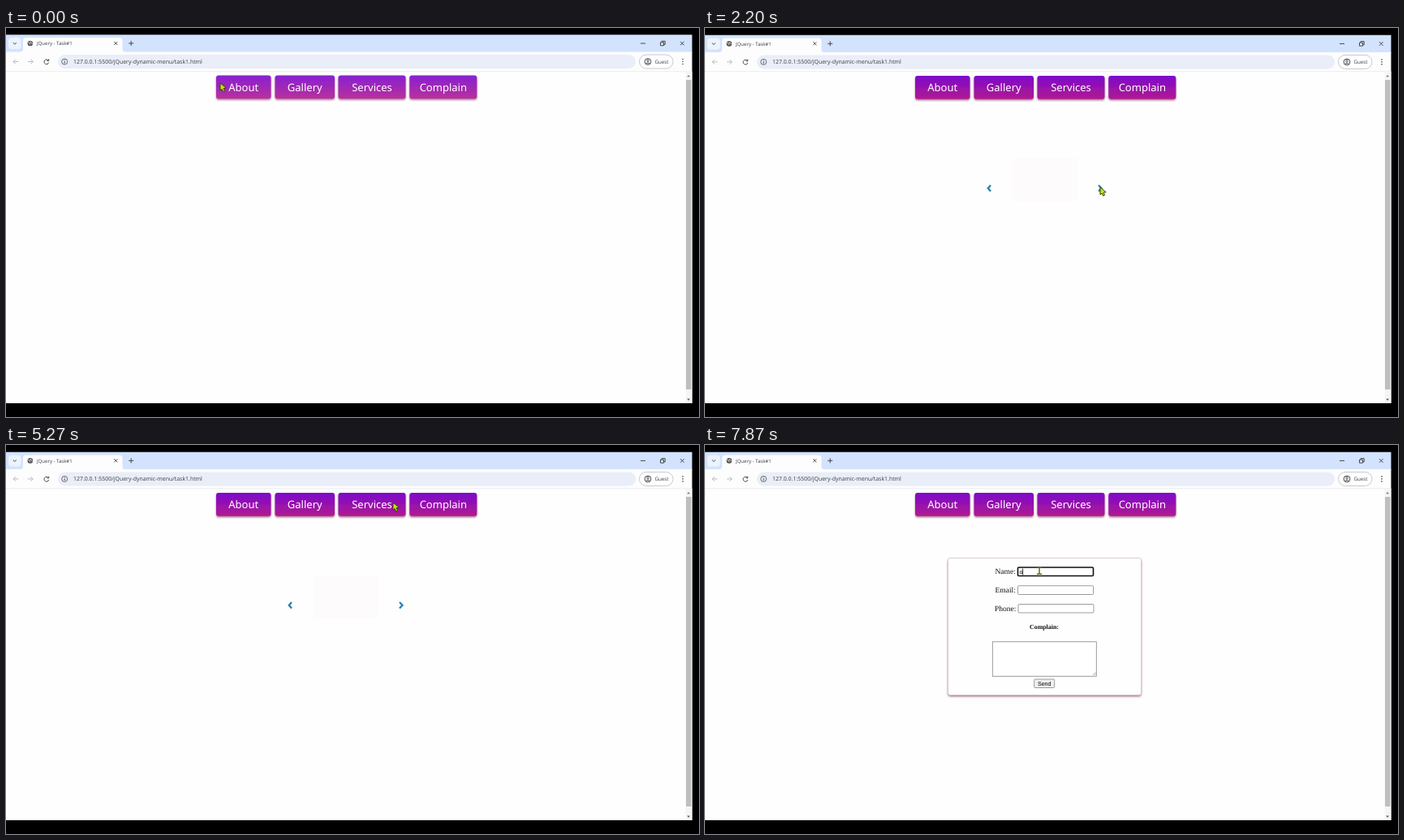
These frames come from a looping animation (854x480 px, 8 s). An HTML page:

```html
<!DOCTYPE html>
<html lang="en">
<head>
<meta charset="utf-8">
<title>Dynamic menu</title>
<style>
html, body { margin: 0; width: 100%; height: 100%; overflow: hidden; background: #000; }
svg { display: block; width: 854px; height: 480px; text-rendering: geometricPrecision; }
.ui { font-family: "Open Sans", sans-serif; fill: #3a3d42; }
.menu { font: 500 13px "Noto Sans", sans-serif; fill: #fff; text-anchor: middle; }
.item { font: 700 8.7px "Noto Sans", sans-serif; fill: #fff; text-anchor: middle; }
.serif { font: 9.5px "Liberation Serif", serif; fill: #111; }
.line { fill: none; stroke: #45484c; stroke-width: 1; }
.field { fill: #fff; stroke: #858585; stroke-width: .8; }
.card { fill: #fefefe; stroke: #d5bfca; stroke-width: .7; filter: url(#soft); }
</style>
</head>
<body>
<svg viewBox="0 0 854 480">
  <defs>
    <linearGradient id="purple" x1="0" y1="0" x2="0" y2="1">
      <stop id="top"/><stop id="bottom" offset="1"/>
    </linearGradient>
    <linearGradient id="warm"><stop stop-color="#f3dccf"/><stop offset="1" stop-color="#faf0dc"/></linearGradient>
    <linearGradient id="cold" x1="0" y1="0" x2="0" y2="1">
      <stop stop-color="#e4e9ea"/><stop offset=".5" stop-color="#e2eff4"/><stop offset="1" stop-color="#b4dcec"/>
    </linearGradient>
    <filter id="soft" x="-10%" y="-10%" width="120%" height="135%">
      <feDropShadow dx="0" dy="1.5" stdDeviation="1" flood-color="#7a2050" flood-opacity=".65"/>
    </filter>
    <clipPath id="frame"><rect x="379" y="161" width="79" height="52.5" rx="2"/></clipPath>
    <clipPath id="slide"><rect id="slideBox" x="405" y="88.5" width="84" height="0"/></clipPath>
  </defs>

  <rect width="854" height="480"/>
  <g id="chrome">
    <rect y="8.3" width="845.5" height="22" fill="#d3e3fd"/>
    <rect y="29.5" width="845.5" height="24.5" fill="#fdfdfe"/>
    <rect x="3" y="12" width="15.5" height="14" rx="4" fill="#edf3fe"/>
    <path class="line" d="M8.7 18l2.1 2 2.1-2"/>
    <path d="M17 30q4-.5 4-4.500V16q0-4 4-4h114.500q4 0 4 4v9.500q0 4 4 4.500z" fill="#fdfdfe"/>
    <circle cx="29.800" cy="19" r="3.300" fill="#55585c"/>
    <path d="M27.200 17.700l2 .7.400 2 M30.300 16.600l.3 1.800 2 .700" fill="none" stroke="#f4f4f4" stroke-width=".8"/>
    <text class="ui" x="38" y="21.300" font-size="6.050">JQuery - Task#1</text>
    <path class="line" d="M133.300 16.900l4 4m0-4l-4 4M151.200 18.900h6m-3-3v6M782 19h6M831 16.700l4.600 4.600m0-4.600l-4.600 4.600"/>
    <path class="line" d="M806.500 17.700h4v4h-4zM808 17.500v-1.300h4.200v4.200h-1.500" stroke-width=".8"/>
    <path class="line" d="M15.200 41.500H9m2.800-2.800L9 41.500l2.800 2.800M27 41.500h6.200m-2.800-2.800l2.800 2.800-2.800 2.800" style="stroke:#b8babd"/>
    <path class="line" d="M52.200 40a2.900 2.900 0 1 0 .5 2.600M52.700 38.300v2.200h-2.200"/>
    <rect x="64" y="33" width="712" height="17" rx="8.500" fill="#e9eef8"/>
    <circle class="line" cx="72.200" cy="41.500" r="3.500" style="stroke-width:.8"/>
    <path class="line" d="M72.200 41v2.500M72.200 39.300v.9"/>
    <text class="ui" x="83" y="44" font-size="6.960">127.0.0.1:5500/jQuery-dynamic-menu/task1.html</text>
    <rect x="780.500" y="33" width="41.500" height="17" rx="8.500" fill="#fff" stroke="#b9bcc1" stroke-width=".8"/>
    <circle class="line" cx="791" cy="41.500" r="3.900"/>
    <circle class="line" cx="791" cy="40.300" r="1.300" style="stroke-width:.9"/>
    <path class="line" d="M788.500 44q2.500-2 5 0"/>
    <text class="ui" x="799.500" y="43.700" font-size="6.200">Guest</text>
    <path d="M834 38.500v.01M834 41.500v.01M834 44.500v.01" stroke="#45484c" stroke-width="1.600" stroke-linecap="round"/>
  </g>
  <rect y="54" width="845.500" height="409" fill="#fefefe"/>
  <rect y="53.500" width="845.500" height=".7" fill="#e3e5e8"/>
  <rect x="837.500" y="54" width="8" height="409" fill="#f5f5f5"/>
  <rect x="838" y="64" width="6.500" height="382" fill="#bfbfbf"/>
  <path d="M839.200 60.300l1.900-2.200 1.900 2.200z" fill="#777"/>
  <path d="M839.200 457.500l1.900 2.200 1.900-2.200z" fill="#555"/>

  <g id="about">
    <rect class="card" x="286" y="143" width="265" height="156" rx="3"/>
    <g id="lines"></g>
  </g>

  <g id="gallery">
    <path d="M352 194l-3.200 3.700 3.200 3.800M485 194l3.500 3.700-3.500 3.800" fill="none" stroke="#2c7fae" stroke-width="2.300"/>
    <rect x="379" y="161" width="79" height="52.500" fill="#fdfbfb"/>
    <g clip-path="url(#frame)">
      <g id="pic0">
        <rect x="379" y="161" width="79" height="53" fill="url(#warm)"/>
        <g id="bokeh"></g>
        <path d="M379 205q30-7 79 0v9h-79z" fill="#f3dcc4"/>
        <ellipse cx="433" cy="201" rx="18" ry="13" fill="#f6ede0"/>
        <ellipse cx="452" cy="197" rx="6" ry="4" fill="#f4e9da" transform="rotate(30 452 197)"/>
        <circle cx="432" cy="175" r="14.500" fill="#f9eee2"/>
        <path d="M409 166q0-6 8-6h28q6 3 5 10-18-8-36-1z" fill="#267fac"/>
        <path d="M410 166q20-6 39 2" fill="none" stroke="#7dbbd0" stroke-width="1.500"/>
        <path d="M417 180q16 8 28 1l-2 5q-9 4-18 2z" fill="#4aa2b0"/>
        <path d="M421 183l14 3-9 20-14-5z" fill="#f0cf48"/>
        <path d="M419 186l15 4M416 192l14 5M413 198l14 5" stroke="#d14f3c" stroke-width="2.200"/>
        <path d="M420 183l15 4M415 195l13 5" stroke="#398ba6" stroke-width="1.500"/>
        <circle cx="432" cy="176.500" r="3.400" fill="#ee8524"/>
        <path d="M427 172v.01M437.500 172v.01" stroke="#222" stroke-width="2" stroke-linecap="round"/>
        <path d="M425.500 179q6 5.500 13 0" fill="none" stroke="#90584a" stroke-width=".8"/>
        <path d="M416.700 161v23" stroke="#fff5ec" stroke-width="1"/>
      </g>
      <g id="pic1">
        <rect x="379" y="161" width="79" height="53" fill="url(#cold)"/>
        <path d="M379 194q20-4 38 4t41 4v12h-79z" fill="#b9dfee"/>
        <ellipse cx="411" cy="190" rx="17" ry="9" fill="#f3f7f8"/>
        <circle cx="416" cy="180" r="10" fill="#f6f6f5"/>
        <path d="M406 178q0-9 10-9 11 0 14 9-13-4-24 0z" fill="#574039"/>
        <path d="M407 175q11-4 21 0" fill="none" stroke="#d9c7b6" stroke-width="1.500"/>
        <circle cx="416.500" cy="169" r="2.800" fill="#3d3531"/>
        <path d="M407 182q10 5 21 0l6-2 7 6 8 13" fill="none" stroke="#b92f3c" stroke-width="4.500"/>
        <path d="M407 182q10 5 21 0l6-2 7 6 8 13" fill="none" stroke="#4f3d38" stroke-width="4.500" stroke-dasharray="2 3"/>
        <path d="M443 197l6-2 1 5-4 2z" fill="#d3203c"/>
        <path d="M412 178v.01M420 178v.01" stroke="#222" stroke-width="1.700" stroke-linecap="round"/>
        <circle cx="416" cy="180" r="1.300" fill="#d64d32"/>
        <path d="M421 187v.01M423 191v.01" stroke="#b51f36" stroke-width="3" stroke-linecap="round"/>
      </g>
      <g id="pic2">
        <rect x="379" y="161" width="79" height="53" fill="#fdfbfb"/>
        <ellipse cx="420" cy="208" rx="25" ry="4" fill="#dfdfdf"/>
        <path d="M398 191l-8-5m3 2l-3 2M440 191l7-3m-3 1l2 3M416 190l3 3 4-4" fill="none" stroke="#80553e" stroke-width="1.300"/>
        <g id="pair"></g>
        <path d="M411 188h6l2 11h-6z" fill="#48cdd0"/>
        <path d="M412 191h6M413 195h6" stroke="#a7eeed"/>
      </g>
    </g>
  </g>

  <g id="form">
    <rect class="card" x="299.500" y="139.500" width="238" height="169" rx="3"/>
    <text class="serif" x="357.500" y="159">Name:</text>
    <text class="serif" x="357.500" y="181.600">Email:</text>
    <text class="serif" x="357" y="204.600">Phone:</text>
    <rect class="field" id="nameField" x="385.500" y="151" width="93" height="10.500" rx="1.300"/>
    <rect class="field" x="385.500" y="173.700" width="93" height="10.800" rx="1"/>
    <rect class="field" x="386" y="196.500" width="93" height="10.500" rx="1"/>
    <text class="serif" x="418" y="227.300" text-anchor="middle" style="font-size:7.900px;font-weight:bold">Complain:</text>
    <rect class="field" x="354.300" y="242.800" width="128" height="42.500"/>
    <path d="M478 284l3.500-3.500M480 284l1.500-1.500" stroke="#777" stroke-width=".6"/>
    <rect class="field" x="405.700" y="289" width="25" height="10.500" rx="1.300" style="fill:#efefef"/>
    <text x="418.200" y="296.800" text-anchor="middle" font-family="Liberation Sans, sans-serif" font-size="7.100">Send</text>
    <text id="typed" x="387.500" y="158.700" font-family="Liberation Sans, sans-serif" font-size="7">o</text>
    <rect id="caret" y="152.500" width=".8" height="8"/>
  </g>

  <g id="menu"></g>
  <g id="items" clip-path="url(#slide)"></g>

  <g id="arrow">
    <path d="M0 0v9.200l2.100-1.700 1.700 3.200 1.800-1-1.600-3.100 3.200-.5z" fill="#c5e619" stroke="#39420a" stroke-width="1" stroke-linejoin="round"/>
  </g>
  <path id="beam" d="M409 151.200h2l1 .8 1-.8h2M412 152v6.300M409 159.200h2l1-.8 1 .8h2" fill="none" stroke="#56781f" stroke-width="1.500"/>
</svg>
<script>
const $ = id => document.getElementById(id);
const set = (id, attrs) => { for (const k in attrs) $(id).setAttribute(k, attrs[k]); };
const show = (id, opacity) => set(id, { opacity: +opacity });
const ramp = (t, a, b) => Math.min(1, Math.max(0, (t - a) / (b - a)));
const ease = p => .5 - Math.cos(p * Math.PI) / 2;

$('menu').innerHTML = [['About', 259, 67.5], ['Gallery', 331.5, 73.5], ['Services', 409.5, 83], ['Complain', 497.3, 83]]
  .map(([name, x, w]) => `<rect x="${x}" y="58.5" width="${w}" height="28.8" rx="3" fill="url(#purple)" filter="url(#soft)"/>
    <text class="menu" x="${x + w / 2}" y="77.6">${name}</text>`).join('');

$('items').innerHTML = [0, 1, 2].map(i => `<rect x="410" y="${89 + i * 21.2}" width="74" height="21" rx="3" fill="url(#purple)"/>
  <text class="item" x="447" y="${103.6 + i * 21.2}">Item #${i + 1}</text>`).join('');

$('lines').innerHTML = ['Lorem ipsum dolor sit amet, consectetur adipiscing elit,', 'sed do eiusmod tempor incididunt ut labore et dolore',
  'magna aliqua. Ut enim ad minim veniam, quis nostrud', 'exercitation ullamco laboris nisi ut aliquip ex ea',
  'commodo consequat. Duis aute irure dolor in', 'reprehenderit in voluptate velit esse cillum dolore.']
  .map((s, i) => `<text class="serif" text-anchor="middle" x="418" y="${170 + i * 22}">${s}</text>`).join('');

$('bokeh').innerHTML = Array.from({ length: 22 }, (_, i) =>
  `<circle cx="${381 + i * 17 % 34}" cy="${164 + i * 11 % 27}" r="${2 + i % 3}" opacity=".5" fill="${['#fff4ec', '#e9b4bb', '#b9dcd2', '#f8e3c0'][i % 4]}"/>`).join('');

$('pair').innerHTML = [[406, '#4bd0d2', '#a5eeee'], [432, '#d42f91', '#f07bbb']].map(([x, dark, light], i) => `
  <ellipse cx="${x}" cy="199.500" rx="11" ry="10" fill="#e8eaeb"/><ellipse cx="${x - 2}" cy="198" rx="8" ry="7" fill="#f6f7f7"/>
  <circle cx="${x}" cy="178" r="9" fill="#f1f2f2"/>
  <path d="M${x - 10} ${177 + i}q-1-${12 - i * 2} 10-${12 - i * 2}t10 ${12 - i * 2}q-10-5-20 0z" fill="${dark}"/>
  <path d="M${x - 4} ${167 + i}v7M${x + 4} ${167 + i}v7" stroke="${light}" stroke-width="2"/>
  <path d="M${x - 8} 184q8 4 16 0v6q-8 3-16 0z" fill="${dark}"/>
  <path d="M${x - 4} 186v5M${x + 1} 186v5M${x + 6} 185v5" stroke="${light}" stroke-width="1.500"/>
  <path d="M${x - 3} 177v.01M${x + 4} 177v.01" stroke="#222" stroke-width="1.800" stroke-linecap="round"/>
  <circle cx="${x + .5}" cy="180" r="1.300" fill="#ee7b3a"/>`).join('');

// Pointer tip: time, x, y
const path = [[0, 264, 68], [530, 264, 68], [730, 351, 79], [1270, 351, 79], [1730, 487, 196.500], [4000, 487, 196.500],
  [4400, 486, 196], [4800, 487, 196], [5200, 477, 71], [5930, 477, 71], [6470, 522, 81.500], [6870, 522, 81.500], [7130, 411, 150], [8000, 411, 150]];

function pointer(t) {
  const i = path.findIndex(k => k[0] > t), [t0, x0, y0] = path[i - 1], [t1, x1, y1] = path[i];
  const p = ease(ramp(t, t0, t1));
  return `translate(${x0 + (x1 - x0) * p} ${y0 + (y1 - y0) * p})`;
}

function draw(t) {
  const late = t >= 2200;
  set('top', { 'stop-color': late ? '#7c08cc' : '#8720d2' });
  set('bottom', { 'stop-color': late ? '#b01b90' : '#b9319b' });
  const shift = `translate(0 ${late ? .4 : 0})`;
  set('chrome', { transform: shift });
  set('menu', { transform: shift });

  show('about', ramp(t, 70, 330) * (t >= 130 && t < 1070));
  show('gallery', ramp(t, 1000, 1130) * (1 - ramp(t, 5470, 5670)));
  show('pic0', 1 - ease(ramp(t, 1870, 2200)));
  show('pic1', ease(ramp(t, 2200, 2600)) * (1 - ease(ramp(t, 4000, 4200))));
  show('pic2', ease(ramp(t, 4200, 4400)) * (1 - ease(ramp(t, 4430, 4800))));
  set('slideBox', { height: 64.500 * ease(ramp(t, 5670, 6000)) * (1 - ease(ramp(t, 6530, 6730))) });

  const focused = t >= 7270, typed = t >= 7870;
  show('form', ramp(t, 6530, 6730));
  set('nameField', { style: focused ? 'stroke:#101010;stroke-width:1.600' : '' });
  show('typed', typed);
  show('caret', focused && (t < 7470 || t >= 7730));
  set('caret', { x: typed ? 391.300 : 387.400 });

  show('arrow', t < 7130);
  show('beam', t >= 7130);
  set('arrow', { transform: pointer(t) });
}

function tick() {
  const step = Math.floor(performance.now() % 8000 * .015);
  draw(Math.round(step * 100 / 15) * 10);
  requestAnimationFrame(tick);
}
tick();
</script>
</body>
</html>
```
